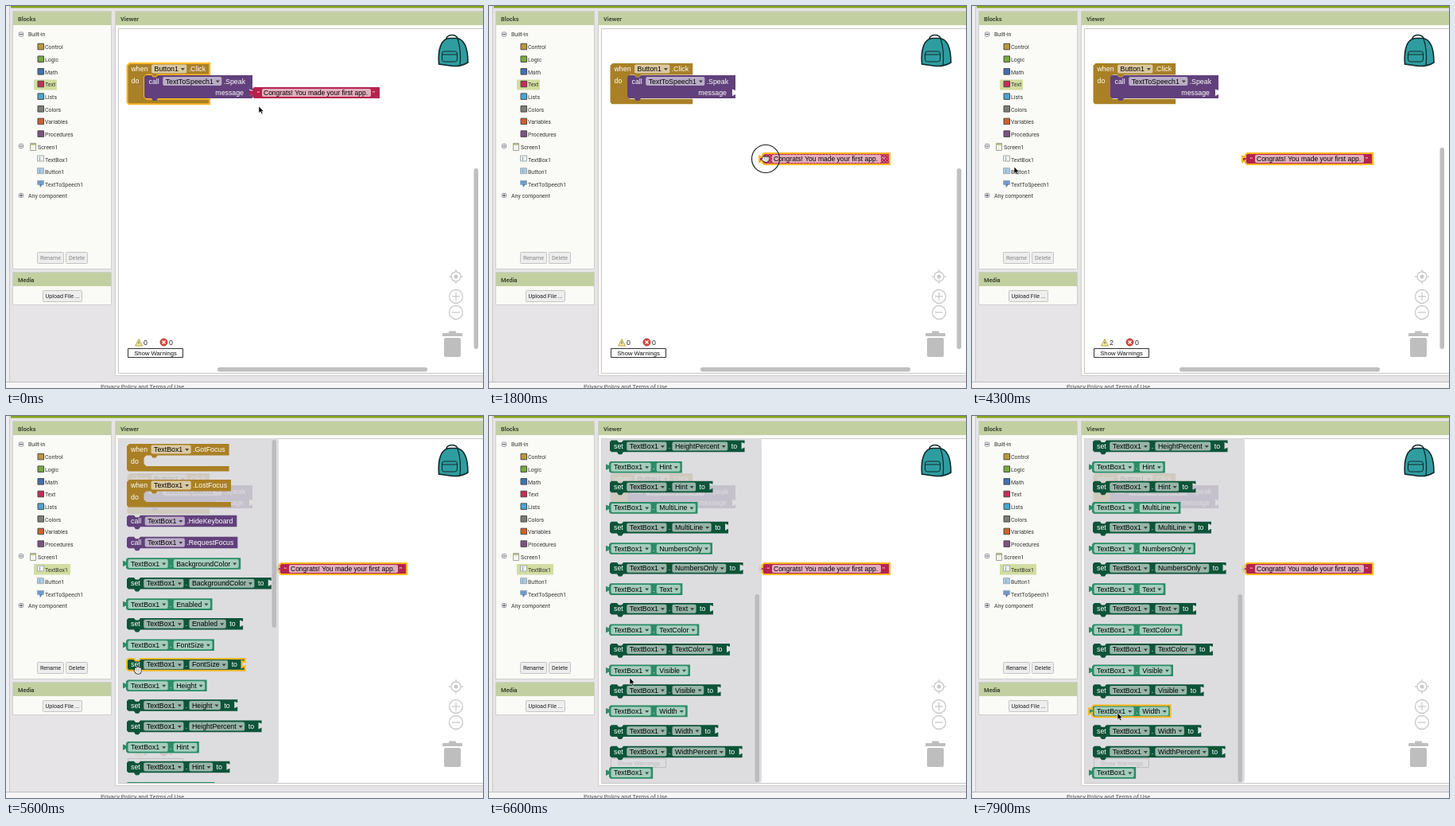
An HTML page with a canvas that plays this animation: 600x480 px, repeating every 8 s.

```html
<!DOCTYPE html>
<html>
<head>
<meta charset="utf-8">
<style>
html, body { margin: 0; width: 100%; height: 100%; overflow: hidden; background: #e6e4e7; }
canvas { display: block; width: 600px; height: 480px; }
</style>
</head>
<body>
<canvas id="stage" width="600" height="480"></canvas>
<script>
const c = document.getElementById('stage').getContext('2d');
const UI = 'Roboto, sans-serif', SANS = '"Liberation Sans", Arial, sans-serif', BLOCK = '8.8px ' + SANS;
const GOLD = '#a98025', PURPLE = '#61407b', RED = '#b5234d', GET = '#2c8c66', SET = '#0d5439', SELECT = '#fcb823';
const LOOP = 8000, SCROLL = 352;

// Keyframes: time, x, y
const cursorKeys = [[0, 318, 126], [500, 314, 112], [800, 314, 112], [1100, 333, 170], [1500, 348, 192], [3000, 348, 192],
  [4000, 53, 202], [4300, 53, 202], [4600, 60, 193], [4900, 60, 193], [5500, 166, 318], [5900, 166, 318],
  [6500, 177, 329], [6800, 177, 329], [7700, 183, 373]];
const dragKeys = [[900, 0, 0], [1100, 0, 4], [1300, 26, 60], [1600, 34, 83]];
const scrollKeys = [[5700, 0, 0], [6500, SCROLL, 0]];

function at(keys, t) {
  let a = keys[0];
  for (const b of keys) {
    if (t < b[0]) {
      if (a === b) break;
      let u = (t - a[0]) / (b[0] - a[0]);
      u = u * u * (3 - 2 * u);
      return [a[1] + (b[1] - a[1]) * u, a[2] + (b[2] - a[2]) * u];
    }
    a = b;
  }
  return [a[1], a[2]];
}

function rect(x, y, w, h, fill, stroke, r = 0) {
  c.beginPath();
  c.roundRect(x, y, w, h, r);
  if (fill) { c.fillStyle = fill; c.fill(); }
  if (stroke) { c.strokeStyle = stroke; c.lineWidth = 1; c.stroke(); }
}
function poly(points, fill, stroke, width = 1) {
  c.beginPath();
  points.forEach(p => c.lineTo(p[0], p[1]));
  c.closePath();
  if (fill) { c.fillStyle = fill; c.fill(); }
  if (stroke) { c.strokeStyle = stroke; c.lineWidth = width; c.stroke(); }
}
function line(x1, y1, x2, y2, color, width = 1) {
  c.beginPath();
  c.moveTo(x1, y1);
  c.lineTo(x2, y2);
  c.strokeStyle = color;
  c.lineWidth = width;
  c.stroke();
}
function circle(x, y, r, fill, stroke, width = 1) {
  c.beginPath();
  c.arc(x, y, r, 0, 7);
  if (fill) { c.fillStyle = fill; c.fill(); }
  if (stroke) { c.strokeStyle = stroke; c.lineWidth = width; c.stroke(); }
}
function text(s, x, y, color = '#333', font = '7px ' + UI, align = 'left') {
  c.font = font;
  c.fillStyle = color;
  c.textAlign = align;
  c.textBaseline = 'alphabetic';
  c.fillText(s, x, y);
}
function width(s) {
  c.font = BLOCK;
  return c.measureText(s).width;
}

// A row of labels and [dropdown] fields; returns the right edge
function row(parts, x, y, paint) {
  parts.forEach((part, i) => {
    const field = Array.isArray(part), s = field ? part[0] : part;
    if (i) x += s[0] === '.' || parts[i - 1] === '.' ? 2.3 : 4.5;
    const w = width(s);
    if (field) {
      if (paint) {
        rect(x, y - 5.5, w + 14, 11, 'rgba(255,255,255,.57)', null, 2);
        text(s, x + 3.5, y + 3, '#000', BLOCK);
        const ax = x + w + 9;
        poly([[ax - 2.5, y - 1], [ax + 2.5, y - 1], [ax, y + 2]], 'rgba(0,0,0,.65)');
      }
      x += w + 14;
    } else {
      if (paint) text(s, x, y + 3, '#fff', BLOCK);
      x += w;
    }
  });
  return x;
}

function block(x, y, w, h, color, { stem, socket, tab, selected }) {
  const r = x + w, b = y + h, p = [[x + 2, y]];
  if (stem) p.push([x + 9, y], [x + 11, y + 2.5], [x + 15, y + 2.5], [x + 17, y]);
  p.push([r, y]);
  if (socket) {
    const s = y + socket;
    p.push([r, s - 3], [r - 4, s - 4.5], [r - 4, s + 4], [r, s + 2]);
  }
  p.push([r, b]);
  if (stem) p.push([x + 17, b], [x + 15, b + 3], [x + 11, b + 3], [x + 9, b]);
  p.push([x + 2, b], [x, b - 2]);
  if (tab) p.push([x, y + 9], [x - 4, y + 11], [x - 4, y + 3.5], [x, y + 5]);
  p.push([x, y + 2]);
  poly(p, color, selected && SELECT, 2);
}

function eventBlock(x, y, name, event, inner, selected) {
  const parts = ['when', [name], event];
  const r = row(parts, x + 5, y + 7, false) + 5, top = y + 14.5, low = y + inner, i = x + 21.5;
  poly([[x + 3, y], [r, y], [r, top], [i + 17, top], [i + 15, top + 3], [i + 11, top + 3], [i + 9, top],
    [i + 3, top], [i, top + 3], [i, low - 3], [i + 3, low], [r, low], [r, low + 6.5], [x + 2, low + 6.5],
    [x, low + 4], [x, y + 3]], GOLD, selected && SELECT, 2);
  row(parts, x + 5, y + 7, true);
  text('do', x + 5, y + 25, '#fff', BLOCK);
}

function textBlock(dx, dy, selected, hatched) {
  const x = 310 + dx, y = 102 + dy;
  block(x, y, 160, 14, RED, { tab: true, selected });
  if (hatched) {
    c.save();
    c.beginPath();
    c.rect(x + 1, y + 1, 158, 12);
    c.clip();
    for (let i = -14; i < 160; i += 4) {
      line(x + i, y, x + i + 14, y + 14, 'rgba(255,190,190,.45)', .8);
      line(x + i, y + 14, x + i + 14, y, 'rgba(255,190,190,.45)', .8);
    }
    c.restore();
  }
  rect(x + 12, y + 2, 137, 10, '#e3aebd', null, 2);
  text('“', x + 6, y + 11, '#fff', BLOCK);
  text('”', x + 151, y + 11, '#fff', BLOCK);
  text('Congrats! You made your first app.', x + 14, y + 10, '#000', '8.5px ' + SANS);
}

// Flyout contents: kind, label, y
const items = [['event', '.GotFocus', 42], ['event', '.LostFocus', 87], ['call', '.HideKeyboard', 132], ['call', '.RequestFocus', 159]];
let nextY = 185.5;
for (const name of ['BackgroundColor', 'Enabled', 'FontSize', 'Height', 'HeightPercent', 'Hint', 'MultiLine',
  'NumbersOnly', 'Text', 'TextColor', 'Visible', 'Width', 'WidthPercent']) {
  if (!name.endsWith('Percent')) {
    items.push(['get', name, nextY]);
    nextY += 24.7;
  }
  items.push(['set', name, nextY]);
  nextY += 26.4;
}
items.push(['get', '', nextY]);

function flyoutItem([kind, name, cy], scroll, hover) {
  const y = cy - scroll;
  if (y < 0 || y > 480) return;
  const box = ['TextBox1'];
  if (kind === 'event') return eventBlock(152, y - 7, 'TextBox1', name, 28, hover);
  const get = kind === 'get', x = get ? 151 : 152;
  const parts = get ? (name ? [box, '.', [name]] : [box])
    : kind === 'set' ? ['set', box, '.', [name], 'to'] : ['call', box, name];
  const start = x + (get ? 2.5 : 5);
  const right = row(parts, start, y, false) + (get ? 2.5 : kind === 'set' ? 9.5 : 5);
  block(x, y - 7.3, right - x, 14.6, get ? GET : kind === 'set' ? SET : PURPLE,
    { tab: get, stem: !get, socket: kind === 'set' && 7, selected: hover });
  row(parts, start, y, true);
}

function flyout(scroll, hovered) {
  c.save();
  c.beginPath();
  c.rect(141, 28, 202, 433);
  c.clip();
  rect(136, 28, 207, 433, 'rgba(216,215,219,.85)', null, 4);
  items.forEach(it => flyoutItem(it, scroll, it === hovered));
  rect(334.5, 30 + scroll / SCROLL * 194, 5.5, 236, '#bcbcbe', null, 2.7);
  c.restore();
}

function panel(x, y, w, h, title) {
  rect(x - .5, y - .5, w + 1, h + 1, '#fafaf6', '#cfcfcf');
  rect(x, y, w, 17, '#c2d0a1');
  text(title, x + 6, y + 11.5, '#3c4630', 'bold 7.4px ' + UI);
}

function button(s, x, y, w, h, color) {
  rect(x + .5, y + .5, w, h, '#eeeeee', '#c4c4c4', 1);
  text(s, x + w / 2 + .5, y + h / 2 + 3, color, '7.2px ' + UI, 'center');
}

function toggle(y, closed) {
  rect(16.5, y - 2.5, 5, 5, '#fff', '#8a8f98', 1);
  line(17.5, y, 20.5, y, '#333');
  if (closed) line(19, y - 1.5, 19, y + 1.5, '#333');
}

function sidebar(open) {
  panel(9, 7, 123, 323, 'Blocks');
  panel(9, 335, 123, 40, 'Media');
  if (open) rect(35, 186, 46, 13.5, '#d2dda1');
  else rect(35, 92.5, 29, 13, '#d2dda1');
  toggle(35.5);
  toggle(176);
  toggle(238, true);
  text('Built-in', 28, 38);
  text('Screen1', 40, 180);
  text('Any component', 28, 240.5);
  const groups = [['Control', '#bd983a'], ['Logic', '#77ab41'], ['Math', '#3f71b5'], ['Text', '#c72d59'],
    ['Lists', '#49a6d4'], ['Colors', '#7d7d7d'], ['Variables', '#d05f2d'], ['Procedures', '#7c5385']];
  groups.forEach(([name, color], i) => {
    const y = 51.3 + i * 15.65;
    rect(40, y - 4, 7.5, 7.5, color, '#4a4a45');
    text(name, 49, y + 3);
  });
  ['TextBox1', 'Button1', 'TextToSpeech1'].forEach((name, i) => {
    const y = 192.5 + i * 15.7;
    rect(39.5, y - 4.5, 8, i === 2 ? 5 : 7, ['#eef0ee', '#a9cbe4', '#6d9bd0'][i], '#a5adb0');
    if (i === 2) poly([[42, y], [46, y], [43, y + 4]], '#5580b8');
    else line(42.5, y - 3, 42.5, y + 2, '#8aa');
    text(name, 49, y + 3);
  });
  rect(30.5, 172.5, 7, 9, '#f5f5ee', '#a0a595');
  rect(31, 173, 6, 2, '#b5c58f');
  button('Rename', 39, 309, 33, 14, open ? '#222' : '#888');
  button('Delete', 75, 309, 27, 14, open ? '#222' : '#888');
  button('Upload File ...', 46, 357, 49, 14, '#222');
}

function backpack() {
  const ink = '#10282c';
  c.beginPath();
  c.ellipse(561, 41, 7, 4.5, 0, Math.PI, 0);
  c.strokeStyle = ink;
  c.lineWidth = 1.6;
  c.stroke();
  c.beginPath();
  c.moveTo(544.5, 73);
  c.bezierCurveTo(543, 55, 547, 41, 558, 40.5);
  c.lineTo(567, 40.5);
  c.bezierCurveTo(577, 42, 581, 55, 581, 71);
  c.quadraticCurveTo(573, 76, 562, 75.5);
  c.closePath();
  c.fillStyle = '#2f9da0';
  c.fill();
  c.stroke();
  c.beginPath();
  c.moveTo(568, 41);
  c.quadraticCurveTo(573, 56, 571, 75);
  c.lineWidth = 1.2;
  c.stroke();
  rect(548.5, 57, 19, 13, '#2f9da0', ink, 3);
  line(549, 61, 567, 61, ink);
}

function controls() {
  const gray = '#c9c9c9';
  circle(566, 340, 6, null, gray, 1.3);
  circle(566, 340, 2.5, gray);
  for (const [dx, dy] of [[1, 0], [-1, 0], [0, 1], [0, -1]])
    line(566 + dx * 6, 340 + dy * 6, 566 + dx * 9, 340 + dy * 9, gray, 1.3);
  for (const y of [365, 385]) {
    circle(566, y, 8.5, null, gray, 1.3);
    line(561, y, 571, y, gray, 1.3);
  }
  line(566, 360, 566, 370, gray, 1.3);
  rect(549, 411, 25, 4, '#bebebe', null, 1);
  rect(557, 408.5, 9, 3, '#bebebe', null, 1);
  rect(551, 417, 21, 24, '#bebebe', null, 2);
}

function warnings(count) {
  poly([[167, 418.5], [171.5, 427], [162.5, 427]], '#f3e9a0', '#b8ac50');
  line(167, 421.5, 167, 424.5, '#555');
  text(count, 173, 426, '#222', BLOCK);
  circle(198.5, 422.5, 4.5, '#d8453f', '#b53b36');
  line(196.5, 420.5, 200.5, 424.5, '#fff', 1.3);
  line(200.5, 420.5, 196.5, 424.5, '#fff', 1.3);
  text('0', 205, 426, '#222', BLOCK);
  rect(153.5, 430.5, 69, 11, '#fff', '#333');
  text('Show Warnings', 188, 439, '#111', '7.7px ' + SANS, 'center');
}

function arrow(x, y) {
  poly([[0, 0], [0, 8.5], [2, 6.7], [3.5, 9.8], [5, 9.1], [3.6, 6.3], [6.2, 6.2]].map(p => [x + p[0], y + p[1]]),
    '#000', 'rgba(255,255,255,.8)', .7);
}

function hand(x, y, closed) {
  c.lineCap = 'round';
  for (const [color, w] of [['#111', 2.8], ['#fff', 1.6]]) {
    for (let i = 0; i < 4; i++)
      line(x - 2.4 + i * 1.8, y + 2, x - 3 + i * 2, y - (closed ? 2 : i % 3 ? 4 : 3), color, w);
    line(x - 1.5, y + 2, x - 4, y + (closed ? 0.5 : 0), color, w);
    line(x - 1, y + 3, x + 2, y + 3, color, w);
  }
  c.lineCap = 'butt';
}

function draw(t) {
  const open = t >= 4700, dropped = t >= 3000, holding = t >= 800 && t < 1900;
  const [mx, my] = at(cursorKeys, t), [dx, dy] = at(dragKeys, t), scroll = at(scrollKeys, t)[0];
  const hovered = open && mx > 147 && items.find(it => Math.abs(it[2] - scroll - my) < 7.5);

  rect(0, 0, 600, 480, '#e6e4e7');
  rect(0, 0, 4, 473, '#eeeeee');
  line(4.5, 0, 4.5, 473, '#c9c9c9');
  rect(6, 0, 594, 2.5, '#86a516');
  rect(0, 472, 600, 8, '#f6f6f6');
  line(0, 472.5, 600, 472.5, '#bdbdbd');
  text('Privacy Policy and Terms of Use', 119, 481, '#555', '7.4px ' + UI);
  sidebar(open);

  panel(138, 7, 463, 457, 'Viewer');
  rect(141.5, 28.5, 460, 433, '#fff', '#c8c8c8');
  backpack();
  controls();
  warnings(t < 2000 ? '0' : '2');
  if (!open) {
    const top = dropped ? 178 : 204;
    rect(588.5, top, 5.5, 431 - top, '#bfbfbf', null, 2.7);
    rect(dropped ? 261 : 266, 454, dropped ? 252 : 264, 5.5, '#bfbfbf', null, 2.7);
  }

  eventBlock(152.5, 72, 'Button1', '.Click', 44.8, t < 800);
  block(174, 87, 136, 29, PURPLE, { stem: true, socket: 22 });
  row(['call', ['TextToSpeech1'], '.Speak'], 179.5, 94.5, true);
  text('message', 299, 112, '#fff', BLOCK, 'right');
  textBlock(dx, dy, t >= 800, t >= 1000 && !dropped);
  if (open) flyout(scroll, hovered);

  if (holding) circle(mx, my, 17.5, null, '#222', 1.2);
  if (holding) hand(mx, my, true);
  else if (t >= 1900 && !dropped) hand(mx, my);
  else if (hovered && hovered[0] !== 'get' && mx < 173) hand(mx, my + 2);
  else arrow(mx, my);
}

function frame() {
  draw(Math.floor(performance.now() % LOOP / 100) * 100);
  requestAnimationFrame(frame);
}
frame();
</script>
</body>
</html>
```
